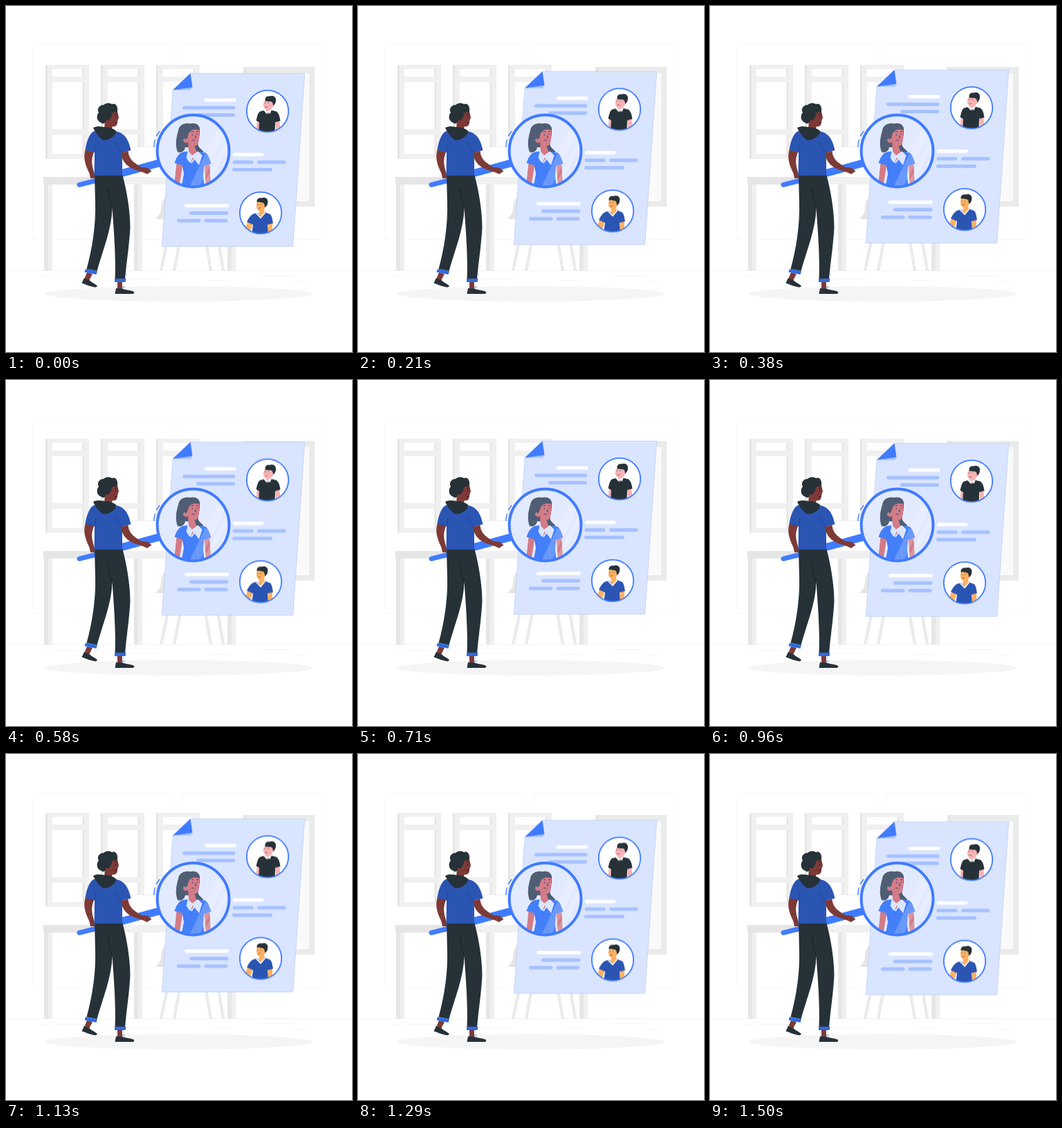
An HTML page that plays this animation: 500 px wide and 500 px high, repeating every 1540 ms.

```html
<!DOCTYPE html>
<html lang="en">
<head>
<meta charset="utf-8">
<title>Reviewing profiles</title>
<style>
html, body { margin: 0; width: 100%; height: 100%; overflow: hidden; background: #fff; }
svg { display: block; width: 100vw; height: 100vh; }
.sheet { animation: bob 1540ms linear -65ms infinite; }
@keyframes bob {
  0%, 100% { transform: translateY(.8px); }
  50% { transform: translateY(-9.2px); }
}
.bars { fill: none; stroke: #a6c1ff; stroke-width: 5; stroke-linecap: round; }
.bars .title { stroke: #fff; }
.ring { fill: none; stroke: #407bff; }
.ink { fill: #263238; }
.skin { fill: #7d3a36; }
.navy { fill: #2b55b3; }
</style>
</head>
<body>
<svg viewBox="0 0 500 500">
  <defs>
    <g id="window">
      <path fill="#f0f0f0" fill-rule="evenodd" d="M0 0H63V136H0ZM10 6V17H56V6ZM10 25V93H56V25ZM10 101V129H56V101Z"/>
      <path fill="#e6e6e6" d="M0 0H3V136H0ZM53.500 6H56V17H53.500ZM53.500 25H56V93H53.500ZM53.500 101H56V129H53.500Z"/>
    </g>
    <g id="leg">
      <path fill="#f0f0f0" d="M0 258H12V382.500H0Z"/>
      <path fill="#e6e6e6" d="M0 258H6V382.500H0Z"/>
    </g>
    <clipPath id="top"><circle cx="378" cy="152" r="30"/></clipPath>
    <clipPath id="low"><circle cx="368" cy="299" r="30"/></clipPath>
    <clipPath id="glass"><circle cx="270.500" cy="209.500" r="51.500"/></clipPath>
  </defs>
  <rect width="500" height="500" fill="#fff"/>

  <!-- room -->
  <g fill="none" stroke="#f7f7f7">
    <rect x="39" y="55.500" width="204" height="282" rx="2"/>
    <rect x="255" y="55.500" width="203.500" height="282" rx="2"/>
    <path stroke="#f0f0f0" stroke-width=".8" d="M0 382.500H500"/>
    <path stroke="#f0f0f0" stroke-width=".7" d="M52 391H64M71 391H131M166 395.500H224M293 396.500H323M368 389.500H416M416 398.500H436"/>
  </g>
  <use href="#window" x="57" y="85"/>
  <use href="#window" x="137" y="85"/>
  <use href="#window" x="217" y="85"/>
  <path fill="#e6e6e6" d="M343 88H446V290H343Z"/>
  <path fill="#ebebeb" d="M348 88H446V290H348Z"/>
  <path fill="#fafafa" d="M351 97H438V282H351Z"/>
  <path fill="#fff" stroke="#f0f0f0" d="M181 247V203.500H232V247"/>
  <use href="#leg" x="55"/>
  <use href="#leg" x="185"/>
  <use href="#leg" x="320"/>
  <path fill="#f0f0f0" d="M54 247H333V258H54Z"/>
  <path fill="#e6e6e6" d="M54 247H128V258H54Z"/>
  <path fill="#e6e6e6" d="M240 272C228 274 224 283 224 293C224 300 219 302 217 308H240Z"/>
  <path fill="none" stroke="#ebebeb" stroke-width="4.500" d="M234 335L224 382.500M252 335L243 382.500M288 335L296 382.500M306 335L314 382.500"/>
  <ellipse cx="249.500" cy="416" rx="193.500" ry="11" fill="#f5f5f5"/>

  <!-- moving sheet -->
  <g class="sheet">
    <path fill="#d9e4ff" stroke="#a9bdf0" stroke-width=".5" d="M266.500 97.300H431.700L414.700 347.500H225.300L241 121.500Z"/>
    <path fill="#a6c1ff" d="M241 121.500L269 117.500L267 121.500Z"/>
    <path fill="#407bff" d="M266.500 97.300L269.500 117.500L241 121.500Z"/>
    <g class="bars">
      <path class="title" d="M289 136H330M330 214.800H370M260.500 288.500H319.500"/>
      <path d="M257.500 147H329M277.500 157.500H328.500M330 225.800H355M365.500 225.800H402M329.500 236.600H382.500M267.500 299.200H319M249.500 310.300H279M289 310.300H318"/>
    </g>

    <circle cx="378" cy="152" r="30" fill="#fff"/>
    <g clip-path="url(#top)">
      <path fill="#f7b3b4" d="M363 164L361 182H366L369 165ZM389 165L390 182H397L395 164ZM374 136C371 141 371 147 375 149L376 156L383 153L384 147C389 145 389 137 384 134Z"/>
      <path class="ink" d="M372 151L378 156L383 150.500L391 152.500C395 156 395.500 161 396.500 166L389 168L388.500 184H365L366 168L361.500 165.500C363 160 364 154 367 152.500Z"/>
      <path class="ink" d="M375 137.500C373 133 377 129 381 130.500C386 128 391 132 390 137C390 140 388 143 386 144C386 141 385 138 382 138Z"/>
      <path fill="#fff" stroke="#d8dde5" stroke-width=".4" d="M373 150L376 155.500L378 153L381.500 155.500L384 149L378 152.500Z"/>
      <path fill="none" stroke="#263238" stroke-width=".6" d="M374.500 139.500V141M379 139.500V141M374.500 146Q377 147 378 145"/>
    </g>
    <circle class="ring" cx="378" cy="152" r="30.200" stroke-width="1.800"/>

    <circle cx="368" cy="299" r="30" fill="#fff"/>
    <g clip-path="url(#low)">
      <path fill="#ffb060" d="M350 310L345 322L353 325L357 313ZM379 313L378 330L385 326V313ZM363 283C361 289 362 295 366 296L365 301L368 305L374 300L373 293C377 290 377 282 372 280Z"/>
      <path class="navy" d="M363 299L369 306L374 298L382 301C385 305 385 310 386 314L378 316L379 331H355L357 316L348 312C351 306 354 301 359 300Z"/>
      <path class="ink" d="M363 284C361 280 365 276 370 277.500C375 275 380 280 378 285C378 288 376 290 374 291C374 287 373 284 370 284C367 284 365 282 363 284Z"/>
      <path fill="none" stroke="#fff" stroke-width="1.600" d="M361.500 299.500L368 306L374.500 298.500"/>
      <path fill="none" stroke="#263238" stroke-width=".6" d="M364 286.500V288M368.500 286.500V288M364.500 292Q367 293 368 291"/>
    </g>
    <circle class="ring" cx="368" cy="299" r="30.200" stroke-width="1.800"/>
  </g>

  <!-- magnifier -->
  <path class="ring" stroke-width="1.300" d="M222 181L217 188M215.500 193Q214 198 213.800 204"/>
  <path class="ring" stroke-width="7" stroke-linecap="round" d="M106 258.300L170 242"/>
  <path class="ring" stroke-width="11" d="M166 242L224 226.300"/>
  <circle cx="270.500" cy="209.500" r="52" fill="#e2eaff"/>
  <g clip-path="url(#glass)">
    <path fill="#505e75" d="M249 180C250 172 258 168 267 170C275 168 281 173 280 180C281 189 275 199 279 204L286 211C279 213 273 211 269 205L259 204C258 210 253 213 248 211C244 201 246 190 249 180Z"/>
    <path fill="#d37c88" d="M247 222L243 259H250.500L256 226ZM286 223L289 259H296L294 222ZM263 196L264 211L268 225L276 213L272.500 202C279 203 280 191 279 179L268 177C264 180 261 186 260 191C256 188 254 194 258 197C260 198.500 262 198 263 196Z"/>
    <path fill="#505e75" d="M254 182C259 171 271 170 280 179C274 177.500 268 178.500 264.500 183C263 186 262.500 191 260.500 193C257 189.500 255 193 255 196C252 192 252 187 254 182Z"/>
    <path fill="#447ffa" d="M262 210L268 228L280 211L289 212C293 216 294.500 222 296.500 227.500L286 231L285 246L287 264H253L257 243L255 230L243.500 227C246 219 250 212 256 211Z"/>
    <path fill="#dce6ff" d="M263 209.500L260.500 219L265.500 227L270 219L279 230L283.500 216L277.500 210L269 216Z"/>
    <path fill="none" stroke="#37405a" stroke-width=".8" d="M269.500 185V187M276 184.500V186.500M268 182L271 181.500M275 181.500L278 181M273 187L275 190H272.500M268 194Q271 192.500 273 195"/>
    <path fill="none" stroke="#3a6ed8" stroke-width=".7" d="M255 230L258 238M286 231L282 240M272 246L276 259"/>
    <path fill="#fff" opacity=".2" d="M262 268L305 178L316 187L277 267ZM281 266L319 194L323 199L289 265Z"/>
  </g>
  <circle class="ring" cx="270.500" cy="209.500" r="51.900" stroke-width="4"/>

  <!-- viewer -->
  <path class="skin" d="M116 204C111 217 113 226 120.500 242L122 249H128V243C124 230 122 222 128 209Z"/>
  <path class="skin" d="M117 385L113 395L120 397L125 387ZM161 397V409H168V397Z"/>
  <path class="ink" d="M113 393L121 396.500C124 400 131 402 132 405L130 406.500C122 406 115 402 109.500 400.500ZM159 408L168 408.500C174 411 184 410.500 185.500 414L184 416H157.500Z"/>
  <path fill="none" stroke="#407bff" stroke-width=".7" d="M168 408L170 405L172 408"/>
  <path class="ink" d="M128 243H168C175 268 179.500 298 179.500 320C178 348 174 370 172 396H157.500C159 365 156 326 153.500 292C153 322 140 352 131.500 383L116.500 380C125 350 130 314 129 285Z"/>
  <path fill="none" stroke="#111b20" stroke-width=".7" d="M148 262Q148 279 153 291"/>
  <path fill="#2f6ae0" d="M115 380L132 383L130.500 388L113.500 384.500ZM157 394H173.500L172.500 399H157Z"/>
  <path class="navy" d="M127 181C120 184 116 198 114.500 208L128 211.500L127.500 245H168V212L180.500 208.500C177 192 171 183 158 181Z"/>
  <path fill="none" stroke="#20428f" stroke-width=".8" d="M128 211L130 200M168 213L162 207L159 198"/>
  <path class="skin" d="M166 212.500L176.500 209.500C177 220 183 226 196 233L205 234L210.500 238.500L204 243L195 239C180 235 169 230 166 212.500Z"/>
  <path class="skin" d="M143 165L142 179L151 183L154 174C159 175 161 172 161 167L163 161L161 152L149 152Z"/>
  <path class="ink" d="M136 168C130 165 131 157 134 154C130 148 137 142 141 143C145 139 151 140 153 142C158 139 162 145 161 152C158 155 154 153 153 156C152 162 149 166 146 165C142 165 145 170 140 170Z"/>
  <path class="ink" d="M126 176C133 172 139 175 144 175C150 175 157 178 159.500 181C158 188 149 194 141 194C134 190 130 184 126 176Z"/>
  <path fill="none" stroke="#1b1014" stroke-width=".8" d="M157 157L160 156M158.500 159V161M157 169L160.500 168"/>
</svg>
</body>
</html>
```
